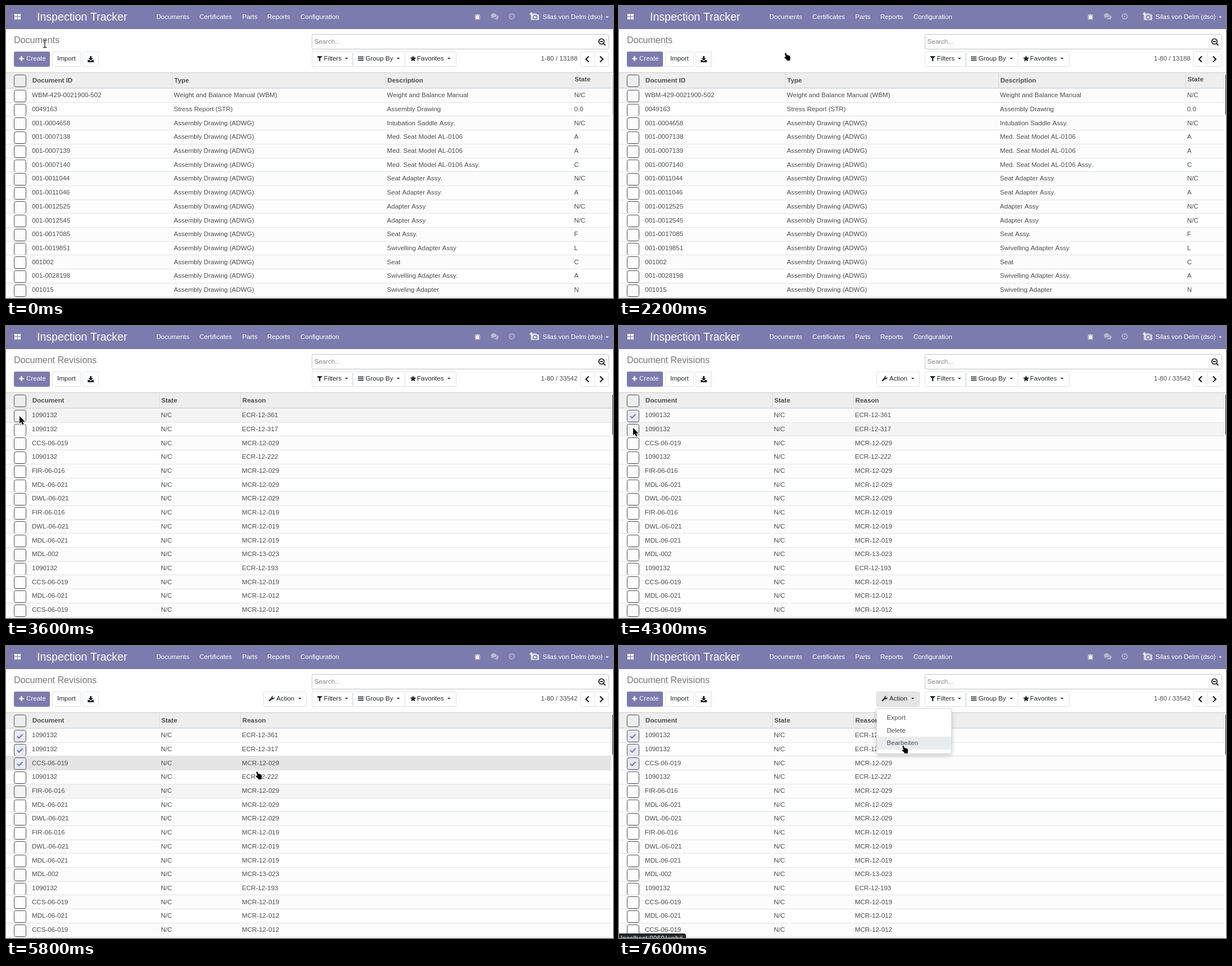
Write an HTML page with a canvas that moves like this. It is 1078 px wide and 519 px high and loops after 8000 ms.

```html
<!DOCTYPE html>
<html lang="en">
<head>
<meta charset="utf-8">
<title>Document list</title>
<style>
html, body { margin: 0; width: 1078px; height: 519px; overflow: hidden; background: #fff; }
canvas { display: block; }
</style>
</head>
<body>
<canvas id="stage" width="1078" height="519"></canvas>
<script>
const ctx = document.getElementById('stage').getContext('2d');
const LOOP = 8000, ROW = 24.7, TOP = 146;
const PURPLE = '#7c7bad', INK = '#4c4c4c', DARK = '#212529', LINE = '#dee2e6';

const adwg = 'Assembly Drawing (ADWG)';
const documents = {
  title: 'Documents', count: '1-80 / 13188',
  heads: ['Document ID', 'Type', 'Description', 'State'],
  cols: [46, 298, 676.5, 1009],
  rows: [
    ['WBM-429-0021900-502', 'Weight and Balance Manual (WBM)', 'Weight and Balance Manual', 'N/C'],
    ['0049163', 'Stress Report (STR)', 'Assembly Drawing', '0.0'],
    ['001-0004658', adwg, 'Intubation Saddle Assy.', 'N/C'],
    ['001-0007138', adwg, 'Med. Seat Model AL-0106', 'A'],
    ['001-0007139', adwg, 'Med. Seat Model AL-0106', 'A'],
    ['001-0007140', adwg, 'Med. Seat Model AL-0106 Assy.', 'C'],
    ['001-0011044', adwg, 'Seat Adapter Assy.', 'N/C'],
    ['001-0011046', adwg, 'Seat Adapter Assy.', 'A'],
    ['001-0012525', adwg, 'Adapter Assy', 'N/C'],
    ['001-0012545', adwg, 'Adapter Assy', 'N/C'],
    ['001-0017085', adwg, 'Seat Assy.', 'F'],
    ['001-0019851', adwg, 'Swivelling Adapter Assy', 'L'],
    ['001002', adwg, 'Seat', 'C'],
    ['001-0028198', adwg, 'Swivelling Adapter Assy.', 'A'],
    ['001015', adwg, 'Swiveling Adapter', 'N']
  ]
};
const revisions = {
  title: 'Document Revisions', count: '1-80 / 33542',
  heads: ['Document', 'State', 'Reason'],
  cols: [46, 275, 419],
  rows: [
    '1090132 ECR-12-361', '1090132 ECR-12-317', 'CCS-06-019 MCR-12-029',
    '1090132 ECR-12-222', 'FIR-06-016 MCR-12-029', 'MDL-06-021 MCR-12-029',
    'DWL-06-021 MCR-12-029', 'FIR-06-016 MCR-12-019', 'DWL-06-021 MCR-12-019',
    'MDL-06-021 MCR-12-019', 'MDL-002 MCR-13-023', '1090132 ECR-12-193',
    'CCS-06-019 MCR-12-019', 'MDL-06-021 MCR-12-012', 'CCS-06-019 MCR-12-012'
  ].map(s => { const [id, why] = s.split(' '); return [id, 'N/C', why]; })
};

// Pointer path: time, x, y, shape
const path = [
  [0, 69, 67, 'beam'], [200, 72, 66, 'beam'], [300, 110, 58, 'arrow'], [500, 235, 36, 'hand'],
  [700, 295, 20, 'hand'], [1100, 295, 20, 'hand'], [1200, 295, 30, 'hand'], [1300, 295, 50, 'hand'],
  [1400, 295, 67, 'hand'], [1600, 294, 82, 'hand'], [1800, 294, 82, 'hand'], [1900, 294, 83, 'hand'],
  [2300, 294, 83, 'arrow'], [2800, 294, 83, 'arrow'], [2900, 139, 119, 'hand'],
  [3100, 85, 135, 'hand'], [3400, 30, 156, 'arrow'], [3600, 24, 160, 'arrow'],
  [4000, 24, 160, 'arrow'], [4100, 25, 181, 'arrow'], [4500, 25, 181, 'arrow'],
  [4800, 24, 208, 'arrow'], [5300, 24, 208, 'arrow'], [5400, 40, 222, 'hand'],
  [5600, 235, 268, 'hand'], [5700, 370, 252, 'hand'], [5800, 444, 223, 'hand'],
  [6000, 478, 160, 'hand'], [6200, 486, 116, 'arrow'], [6400, 488, 91, 'hand'],
  [6800, 488, 91, 'hand'], [7300, 503, 177, 'hand'], [LOOP, 503, 177, 'hand']
];

function pointerAt(t) {
  const i = path.findIndex(k => k[0] > t);
  const [t0, x0, y0, kind] = path[i - 1], [t1, x1, y1] = path[i];
  const f = (t - t0) / (t1 - t0);
  return { x: x0 + (x1 - x0) * f, y: y0 + (y1 - y0) * f, kind };
}

function rect(x, y, w, h, color) {
  ctx.fillStyle = color;
  ctx.fillRect(x, y, w, h);
}

function box(x, y, w, h, fill, stroke, r = 2) {
  ctx.beginPath();
  ctx.roundRect(x + .5, y + .5, w - 1, h - 1, r);
  if (fill) { ctx.fillStyle = fill; ctx.fill(); }
  if (stroke) { ctx.strokeStyle = stroke; ctx.lineWidth = 1; ctx.stroke(); }
}

function text(s, x, y, color = INK, size = 11.57, weight = 'normal') {
  ctx.font = `${weight} ${size}px "Liberation Sans", Arial, sans-serif`;
  ctx.fillStyle = color;
  ctx.fillText(s, x, y);
}

function icon(d, x, y, fill, stroke, width = 1) {
  const p = new Path2D(d);
  ctx.save();
  ctx.translate(x, y);
  if (stroke) { ctx.strokeStyle = stroke; ctx.lineWidth = width; ctx.stroke(p); }
  if (fill) { ctx.fillStyle = fill; ctx.fill(p, 'evenodd'); }
  ctx.restore();
}

const caret = (x, y, color = DARK) => icon('M0 0H5.4L2.7 2.8Z', x, y, color);

function navbar(active) {
  rect(0, 0, 1078, 41, PURPLE);
  rect(0, 40, 1078, 1, '#706fa0');
  if (active) rect(259, 0, 76, 41, '#5f5e97');
  icon('M0 0H5V4.3H0ZM6 0H11V4.3H6ZM0 5.4H5V9.7H0ZM6 5.4H11V9.7H6Z', 15, 14, '#fff');
  text('Inspection Tracker', 55, 26, '#fff', 19.58);
  [['Documents', 267], ['Certificates', 343.5], ['Parts', 419.5], ['Reports', 464], ['Configuration', 523]]
    .forEach(([s, x]) => text(s, x, 23, '#fff'));
  // bug, chat, clock
  icon('M3 3.2A2.4 2.4 0 0 1 7.6 3.2ZM2.6 4H8V8.5Q7.6 11 5.3 11T2.6 8.5Z', 832, 13, '#fff');
  icon('M.8 2.5L3 4.6M9.8 2.5L7.6 4.6M0 6.8H10.6M1 11L3.3 8.8M9.6 11L7.3 8.8', 832, 13, null, '#fff', 1.1);
  const pale = '#b8b7d4';
  icon('M0 4A5 3.8 0 1 1 5 7.6L1 9.2L2 7A4 3.6 0 0 1 0 4ZM11 3.2A4 3.5 0 0 1 12 9.5L13.4 11.6L9.5 10.6A5 4 0 0 1 5.3 9Q11 8.5 11 3.2Z', 861, 13, pale);
  icon('M5.3 .8A4.6 4.6 0 1 1 5.2 .8M5.5 2.8V6H3.3', 893, 13, null, pale, 1.5);
  // avatar placeholder
  icon('M3 4H6L7 2H12L13 4H16Q17 4 17 5V13Q17 14 16 14H3Q2 14 2 13V5Q2 4 3 4Z', 930, 11, '#d6d6e4');
  icon('M13 9A3.3 3.3 0 1 1 6.4 9A3.3 3.3 0 1 1 13 9', 930, 11, null, PURPLE, 1.4);
  icon('M3 0V6M0 3H6', 930, 11, null, '#fff', 1.7);
  text('Silas von Delm (dso)', 953, 23, '#fff');
  caret(1065, 18.5, '#fff');
}

function controls(view, s) {
  text(view.title, 14, 66, '#777', 16.05);
  box(543, 50, 528, 27, '#fff', '#c4c4c8');
  text('Search...', 547.5, 67, '#858585');
  if (s.caret) rect(548, 57, 1, 14, '#222');
  icon('M10.2 5A4.7 4.7 0 1 1 .8 5A4.7 4.7 0 1 1 10.2 5M3 5H8M9 8.5L12.6 12', 1052, 58, null, DARK, 1.8);

  box(14, 81, 64, 27, PURPLE, PURPLE);
  icon('M4.5 0V9M0 4.5H9', 23, 89, null, '#fff', 2.2);
  text('Create', 36, 97, '#fff');
  box(82, 81, 51, 27, '#fff', LINE);
  text('Import', 91, 97, DARK);
  box(136, 81, 29, 27, '#fff', LINE);
  icon('M4 0H7V3.8H10L5.5 8L1 3.8H4ZM0 7H3L5.5 9.2L8 7H11V11H0Z', 145, 89, DARK);

  if (s.action) {
    box(457, 81, 77, 27, s.actionHot ? '#e5e5e5' : '#fff', s.actionHot ? '#dcdcdc' : LINE);
    icon('M1.4 9.6L6 5', 466, 88, null, DARK, 2.5);
    icon('M5 4.6Q4.8 1.8 7.4 .8L9 .7L7.3 2.4V4.3H9.2L10.9 2.6Q11.2 6 8 7Q5.3 7 5 4.6Z', 466, 88, DARK);
    text('Action', 480, 97, DARK);
    caret(519, 92);
  }
  box(543, 81, 73, 27, '#fff', LINE);
  box(616, 81, 93, 27, '#fff', LINE);
  box(708, 81, 92, 27, '#fff', LINE);
  icon('M0 0H10L6.2 4.3V10L3.8 8V4.3Z', 552, 89, DARK);
  icon('M0 1H10M0 4H10M0 7H10', 625, 89.5, null, DARK, 1.7);
  icon('M5.5 0L7.1 3.5L11 4L8.2 6.6L8.9 10.4L5.5 8.5L2.1 10.4L2.8 6.6L0 4L3.9 3.5Z', 717.5, 88, DARK);
  text('Filters', 564.5, 97, DARK);
  text('Group By', 638.5, 97, DARK);
  text('Favorites', 730, 97, DARK);
  [602, 694, 784].forEach(x => caret(x, 92));

  text(view.count, 950, 97);
  box(1020, 81, 26, 27, '#fff', LINE);
  box(1045, 81, 26, 27, '#fff', LINE);
  icon('M5 0L0 5L5 10', 1030, 89.5, null, '#111', 2.1);
  icon('M0 0L5 5L0 10', 1055, 89.5, null, '#111', 2.1);
}

function checkbox(cy, on) {
  box(14, cy - 10, 22, 22, on ? '#e8e8f2' : null, '#4a4a4e', 3);
  if (on) icon('M0 4L3.2 7L9.5 .5', 20, cy - 2.5, null, PURPLE, 2.2);
}

function table(view, s) {
  rect(0, 118, 1075, 28, '#eee');
  rect(0, 118, 1078, 1, '#ccc');
  checkbox(132, false);
  view.heads.forEach((h, i) => {
    const x = view.cols[i];
    if (i) rect(Math.round(x - 3), 119, 1, 27, '#d8dade');
    text(h, x + .8, x > 1000 ? 134 : 136, INK, 11.57, 'bold');
  });
  view.rows.forEach((row, i) => {
    const y = Math.round(TOP + ROW * i), next = Math.round(TOP + ROW * (i + 1));
    const fill = i === s.dark ? '#e5e5e5' : i === s.hover ? '#f4f4f4' : i % 2 ? '#fff' : '#fcfcfc';
    rect(0, y, 1075, next - y, fill);
    if (i) rect(0, y, 1075, 1, LINE);
    checkbox(Math.round(159 + ROW * i), i < s.checked);
    row.forEach((c, j) => text(c, view.cols[j], Math.round(162.2 + ROW * i)));
  });
  rect(0, 517, 1075, 1, LINE);
  rect(0, 145, 1075, 2, '#d9dde3');
  rect(1077, 122, 1, 71, s.bar);
}

function menu(x, y, w, h, items, tx, firstY, pointer) {
  ctx.save();
  ctx.shadowColor = 'rgba(0,0,0,.22)';
  ctx.shadowBlur = 9;
  ctx.shadowOffsetY = 3;
  box(x, y, w, h, '#fff');
  ctx.restore();
  box(x, y, w, h, null, '#d5d7da');
  items.forEach((item, i) => {
    const cy = firstY + 22.7 * i, top = Math.round(cy - 11);
    if (pointer.y >= top && pointer.y < top + 23) rect(x + 1, top, w - 2, 23, '#e9ecef');
    text(item, tx, Math.round(cy + 4));
  });
}

function status(s, width) {
  box(-4, 511, width + 4, 20, '#24282a', '#111', 3);
  text(s, 3, 523.5, '#fff', 12.1);
}

function drawPointer({ x, y, kind }) {
  if (kind === 'beam') {
    icon('M-3 -7Q0 -7 0 -5Q0 -7 3 -7M0 -6V6M-3 7Q0 7 0 5Q0 7 3 7', x, y, null, '#fff', 2.6);
    icon('M-3 -7Q0 -7 0 -5Q0 -7 3 -7M0 -6V6M-3 7Q0 7 0 5Q0 7 3 7', x, y, null, '#111', 1.2);
  } else if (kind === 'hand') {
    icon('M.4 1.2Q1.5 -.4 2.8 1L4.2 4.3Q5.4 3.6 6 4.8Q7.3 4.2 7.9 5.4Q9.3 5 9.8 6.4Q10.8 9 9.8 11.5V14H3.8V12.2L.2 9.5Q-1 8 .6 7.3L2.3 8Z', x, y, '#000', '#fff', 1.8);
  } else {
    icon('M0 0V13.2L3 10.5L5.2 15.6L7.6 14.5L5.4 9.7H9.6Z', x, y, '#000', '#fff', 1.8);
  }
}

function draw(t) {
  const between = (a, b) => t >= a && t < b;
  const p = pointerAt(t);
  const navOpen = between(900, 2100), actionOpen = t >= 6700;
  const view = t < 2300 ? documents : revisions;

  rect(0, 0, 1078, 519, '#fff');
  navbar(between(600, 2100));
  controls(view, {
    caret: between(2400, 3400),
    action: t >= 4000,
    actionHot: t >= 6600
  });
  table(view, {
    checked: [3900, 4500, 5000].filter(at => t >= at).length,
    hover: between(3300, 4100) ? 0 : between(4100, 4700) ? 1 : between(5500, 6400) ? 4 : between(4700, 4800) ? 2 : -1,
    dark: between(4500, 4700) ? 1 : between(4800, 6600) ? 2 : -1,
    bar: t < 900 ? '#ccc' : '#1c1c1c'
  });

  if (navOpen) {
    menu(259, 41, 95, 58, ['Documents', 'Revisions'], 277, 58, p);
    if (t < 1300) status('localhost:8069/web#', 119);
    else status('localhost:8069/web#menu_id=204&action=224', 258);
  }
  if (actionOpen) {
    menu(457, 111, 134, 81, ['Export', 'Delete', 'Bearbeiten'], 475.5, 127, p);
    if (t >= 7500) status('localhost:8069/web#', 119);
  }
  drawPointer(p);
}

const start = performance.now();
function tick() {
  const t = (performance.now() - start) % LOOP;
  draw(Math.floor(t / 100) * 100);
  requestAnimationFrame(tick);
}
tick();
</script>
</body>
</html>
```
